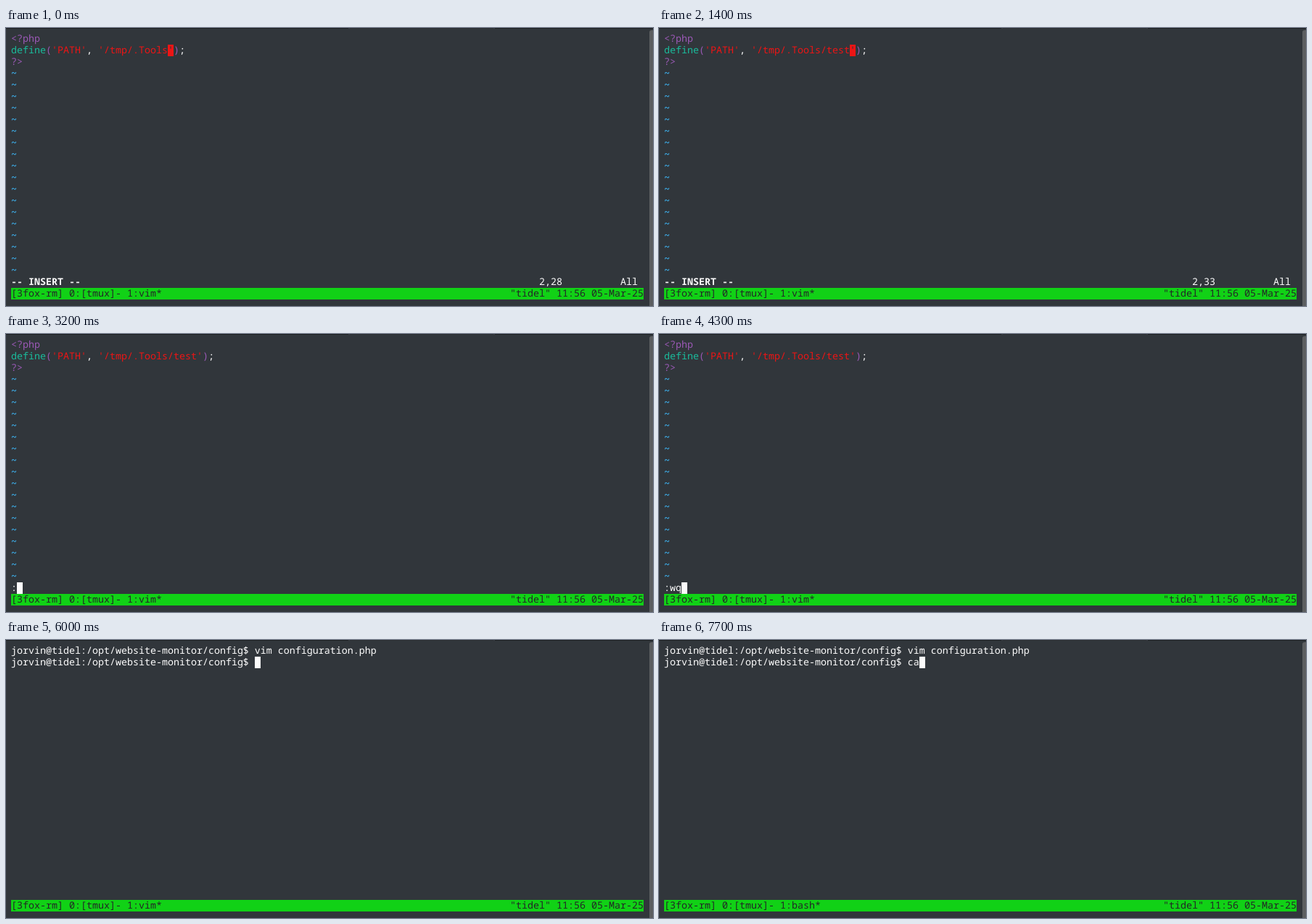
An HTML page that plays this animation: 892 px wide and 384 px high, repeating every 8000 ms.

```html
<!DOCTYPE html>
<html lang="en">
<head>
<meta charset="utf-8">
<title>Terminal session</title>
<style>
  html, body { margin: 0; width: 100%; height: 100%; overflow: hidden; background: #31363b; }
  svg { display: block; width: 892px; height: 384px; }
  text {
    font: 13.3333px "Noto Sans Mono", "DejaVu Sans Mono", monospace;
    font-variant-ligatures: none;
    text-rendering: geometricPrecision;
    white-space: pre;
  }
  .bold { font-weight: 700; }
</style>
</head>
<body>
<svg viewBox="0 0 892 384">
  <path d="M0 0H472V1H0ZM674 0H892V1H674Z" fill="#1b1e21"/>
  <path d="M474 0H672V1H474Z" fill="#2a2e32"/>
  <rect x="887" y="3" width="8" height="390" rx="3" fill="#5c5e60"/>
  <g id="screen"></g>
</svg>
<script>
const LOOP = 8000, CELL = 8, LINE = 16, LEFT = 7, TOP = 7;
const BG = '#31363b', WHITE = '#fcfcfc', RED = '#ed1515', GREEN = '#11d116',
      PURPLE = '#9b59b6', TEAL = '#1abc9c', BLUE = '#3daee9', BLACK = '#232627';
const PROMPT = 'jorvin@tidel:/opt/website-monitor/config$ ';

const escapeText = s => s.replace(/&/g, '&amp;').replace(/</g, '&lt;');

const write = (row, col, text, color = WHITE, bold = false) =>
  `<text x="${LEFT + col * CELL}" y="${TOP + row * LINE + 12}" fill="${color}"` +
  `${bold ? ' class="bold"' : ''}>${escapeText(text)}</text>`;

const block = (row, col, length, color) =>
  `<rect x="${LEFT + col * CELL}" y="${TOP + row * LINE}" width="${length * CELL}" height="${LINE}" fill="${color}"/>`;

const cursor = (row, col, char = '', color = WHITE) =>
  block(row, col, 1, color) + write(row, col, char, BG);

// Consecutive [text, color] runs on one row.
function runs(row, parts) {
  let col = 0;
  return parts.map(([text, color]) => {
    const out = write(row, col, text, color);
    col += text.length;
    return out;
  }).join('');
}

function tildes(from, to) {
  let out = '';
  for (let row = from; row <= to; row++) out += write(row, 0, '~', BLUE, true);
  return out;
}

const statusBar = program =>
  block(22, 0, 109, GREEN) +
  write(22, 0, `[3fox-rm] 0:[tmux]- 1:${program}*`, BLACK) +
  write(22, 86, '"tidel" 11:56 05-Mar-25', BLACK);

const editor = path =>
  write(0, 0, '<?php', PURPLE) +
  runs(1, [['define', TEAL], ['(', PURPLE], ["'PATH'", RED], [', ', WHITE],
           [`'${path}'`, RED], [')', PURPLE], [';', WHITE]]) +
  write(2, 0, '?>', PURPLE) + tildes(3, 20) + statusBar('vim');

function insert(typed) {
  const path = '/tmp/.Tools' + typed, col = 16 + path.length;
  return editor(path) + cursor(1, col, "'", RED) +
    write(21, 0, '-- INSERT --', WHITE, true) +
    write(21, 91, `2,${col + 1}`) + write(21, 105, 'All');
}

const saved = editor('/tmp/.Tools/test');
const normal = () => saved + cursor(1, 31, 't', RED);
const command = text => saved + write(21, 0, text) + cursor(21, text.length);

function confirmWrite() {
  const warning = 'WARNING: The file has been changed since reading it!!!';
  const question = 'Do you really want to write to it (y/n)?';
  return write(0, 0, '?>', PURPLE) + tildes(1, 18) +
    write(19, 0, '"configuration.php"') +
    block(20, 0, warning.length, RED) + write(20, 0, warning, WHITE, true) +
    write(21, 0, question, GREEN) + cursor(21, question.length) + statusBar('vim');
}

const shell = (typed, program) =>
  write(0, 0, PROMPT + 'vim configuration.php') +
  write(1, 0, PROMPT + typed) +
  cursor(1, PROMPT.length + typed.length) + statusBar(program);

const steps = [
  [0, insert('')],
  [100, insert('/')],
  [1000, insert('/t')],
  [1100, insert('/te')],
  [1200, insert('/tes')],
  [1400, insert('/test')],
  [2800, normal()],
  [3200, command(':')],
  [4200, command(':w')],
  [4300, command(':wq')],
  [4600, confirmWrite()],
  [6000, shell('', 'vim')],
  [7000, shell('', 'bash')],
  [7600, shell('c', 'bash')],
  [7700, shell('ca', 'bash')]
];

const screenGroup = document.getElementById('screen');
let shown = null;

function render() {
  const time = performance.now() % LOOP;
  const step = steps.filter(([start]) => start <= time).pop();
  if (step !== shown) {
    screenGroup.innerHTML = step[1];
    shown = step;
  }
  requestAnimationFrame(render);
}
render();
</script>
</body>
</html>
```
